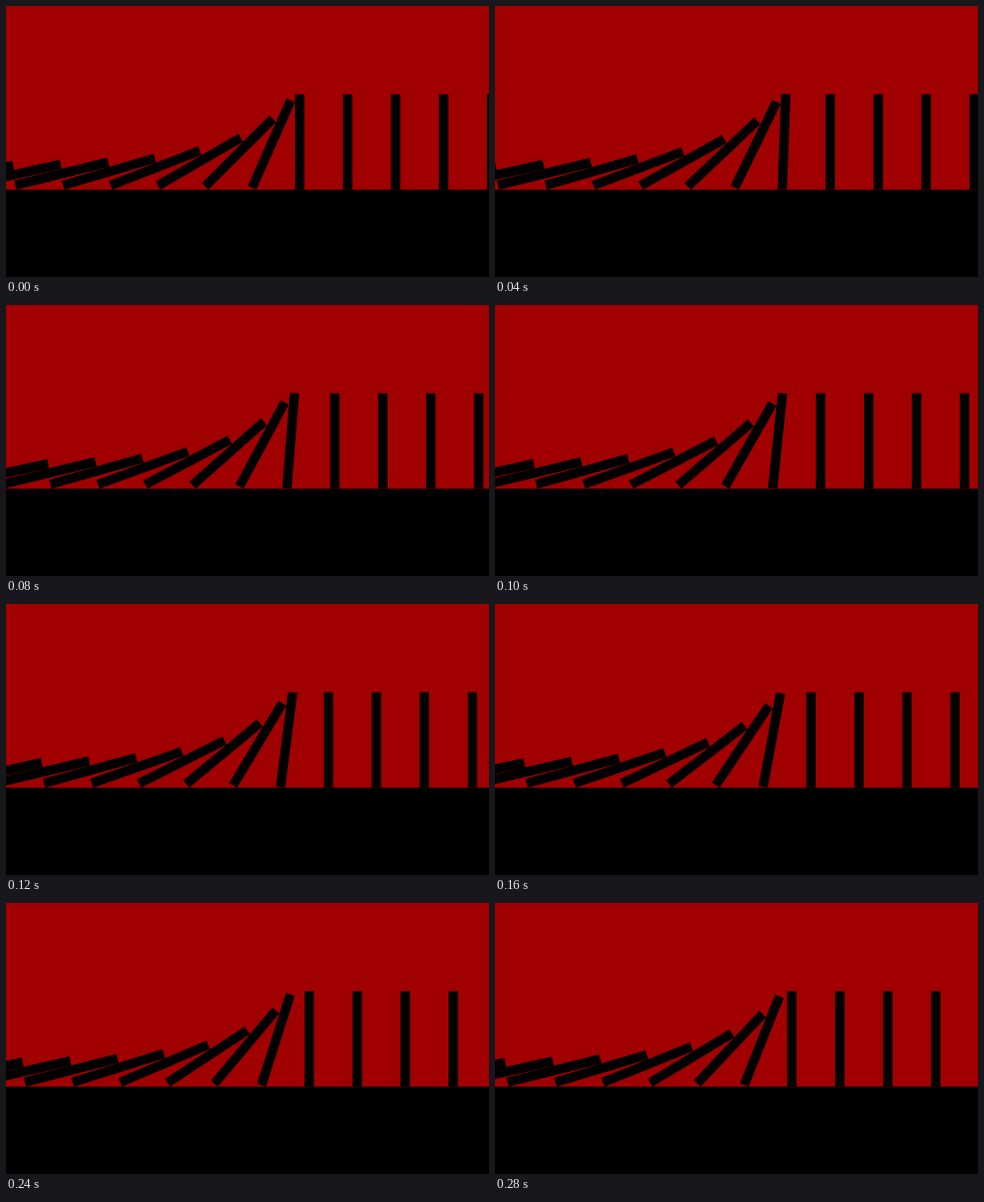
These frames come from a looping animation (500x281 px, 300 ms). An HTML page with a canvas:

```html
<!DOCTYPE html>
<html>
<head>
<meta charset="utf-8">
<title>Falling dominoes</title>
<style>
  html, body { margin: 0; width: 100%; height: 100%; overflow: hidden; background: #a00000; }
  canvas { display: block; }
</style>
</head>
<body>
<canvas id="stage" width="500" height="281"></canvas>
<script>
const ctx = document.getElementById('stage').getContext('2d');
const LOOP = 300, STEP = 20;
const GROUND = 190.5, HEIGHT = 99, WIDTH = 9.7, GAP = 49.67, FRONT = 304;
const CONTACT = Math.asin((GAP - WIDTH) / HEIGHT);

// Angle at which a domino rests against its neighbour leaning at `next`.
const restOn = next =>
  next + Math.asin((GAP * Math.cos(next) - WIDTH) / HEIGHT);

// Each domino tips over its lower right corner.
function domino(centre, angle) {
  ctx.save();
  ctx.translate(centre + WIDTH / 2, GROUND);
  ctx.rotate(angle);
  ctx.fillRect(-WIDTH, -HEIGHT, WIDTH, HEIGHT);
  ctx.restore();
}

function draw(phase) {
  ctx.fillStyle = '#a00000';
  ctx.fillRect(0, 0, 500, 281);
  ctx.fillStyle = '#000';
  ctx.fillRect(0, GROUND, 500, 281 - GROUND);

  const front = FRONT - GAP * phase;
  for (let i = 1; i <= 5; i++) domino(front + i * GAP, 0);

  let angle = CONTACT * phase * (0.62 + 0.38 * phase);
  for (let i = 0; i <= 9; i++) {
    domino(front - i * GAP, angle);
    angle = restOn(angle);
  }
}

function tick() {
  const time = performance.now() % LOOP;
  draw(Math.floor(time / STEP) * STEP / LOOP);
  requestAnimationFrame(tick);
}
tick();
</script>
</body>
</html>
```
